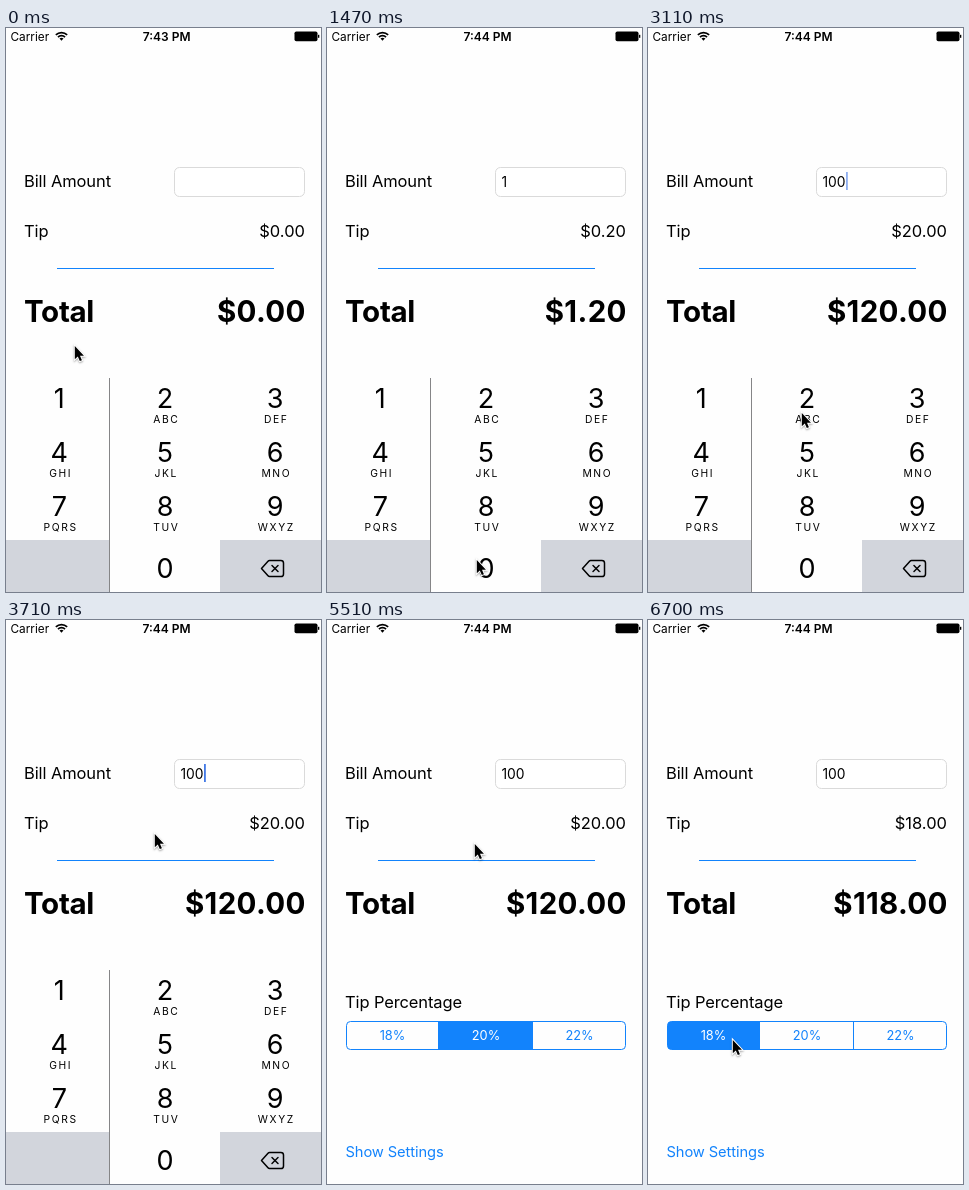
Animation, 315 px wide and 564 px high, one loop 8 s. Source, as an HTML page with a canvas:

```html
<!DOCTYPE html>
<html lang="en">
<head>
<meta charset="utf-8">
<title>Tip calculator</title>
<style>
  html, body { margin: 0; width: 100%; height: 100%; overflow: hidden; background: #fefefe; }
  canvas { display: block; width: 315px; height: 564px; }
</style>
</head>
<body>
<canvas id="stage"></canvas>
<script>
const W = 315, H = 564, LOOP = 8000;
const BG = '#fefefe', BLUE = '#1283fc', GREY = '#d2d5dc';
const canvas = document.getElementById('stage');
const ctx = canvas.getContext('2d');
const dpr = window.devicePixelRatio || 1;
canvas.width = W * dpr;
canvas.height = H * dpr;

// Each track is a list of [time, value...]; a value holds until the next one.
const tracks = {
  pointer: [[0, 68, 317], [140, 63, 341], [290, 59, 363], [1190, 76, 402], [1320, 123, 487],
    [1470, 149, 531], [1620, 150, 537], [3110, 153, 384], [3260, 153, 310], [3410, 151, 254],
    [3560, 149, 226], [3710, 148, 213], [5510, 147, 223], [5660, 129, 293], [5800, 105, 363],
    [5950, 89, 407], [6100, 84, 419]],
  bill: [[0, ''], [890, '1'], [1920, '10'], [2670, '100']],
  caret: [[0, 0], [140, 1], [1320, 0], [1620, 1], [3110, 0.6], [3260, 0], [3560, 1], [4010, 0]],
  clock: [[0, '7:43 PM'], [1190, '7:44 PM']],
  pressed: [[0, ''], [740, '1'], [890, ''], [2520, '0'], [2670, '']],
  slide: [[0, 0], [4010, 111], [4160, 179], [4310, 208], [4460, 220]],
  segment: [[0, 1], [6700, 0]],
  touch: [[0, false], [6550, true], [6700, false]]
};
const rates = [18, 20, 22];
const keys = [['1', ''], ['2', 'ABC'], ['3', 'DEF'], ['4', 'GHI'], ['5', 'JKL'], ['6', 'MNO'],
  ['7', 'PQRS'], ['8', 'TUV'], ['9', 'WXYZ'], ['', ''], ['0', ''], ['del', '']];
const colX = [0, 104, 214, 315], keyX = [53.3, 159, 269];
const KEY_TOP = 350, ROW = 54, LEFT = 18, RIGHT = 299;

function at(track, t) {
  let current = track[0];
  for (const step of track) if (step[0] <= t) current = step;
  return current;
}
const value = (name, t) => at(tracks[name], t)[1];
const money = n => '$' + n.toFixed(2);

function text(str, x, y, size, { weight = 400, color = '#000', align = 'left', track = 0 } = {}) {
  ctx.font = `${weight} ${size}px Inter, Roboto, sans-serif`;
  ctx.letterSpacing = track + 'px';
  ctx.textAlign = align;
  ctx.fillStyle = color;
  ctx.fillText(str, x, y);
}

function rect(x, y, w, h, color) {
  ctx.fillStyle = color;
  ctx.fillRect(x, y, w, h);
}

function poly(points, close) {
  ctx.beginPath();
  points.forEach(([x, y]) => ctx.lineTo(x, y));
  if (close) ctx.closePath();
}

function round(x, y, w, h, r) {
  ctx.beginPath();
  ctx.roundRect(x, y, w, h, r);
}

function stroke(color, width) {
  ctx.strokeStyle = color;
  ctx.lineWidth = width;
  ctx.stroke();
}

function statusBar(clock) {
  text('Carrier', 4.5, 12.5, 11.8);
  text(clock, 160.6, 12.5, 12, { weight: 600, align: 'center' });
  const a = -Math.PI * 0.75, b = -Math.PI * 0.25;
  for (const r of [5, 8]) {
    ctx.beginPath();
    ctx.arc(55.5, 12.6, r, a, b);
    stroke('#000', 1.7);
  }
  ctx.beginPath();
  ctx.moveTo(55.5, 12.8);
  ctx.arc(55.5, 12.6, 2.8, a, b);
  ctx.fillStyle = '#000';
  ctx.fill();
  round(288.5, 3.4, 23, 9.8, 1.8);
  ctx.fill();
  rect(312, 6.8, 1.3, 3, '#000');
}

function billForm(bill, caret, rate) {
  const amount = Number(bill), tip = amount * rate / 100;
  text('Bill Amount', LEFT, 159, 16.5, { track: -0.1 });
  round(168.5, 139.5, 130, 29, 5);
  ctx.fillStyle = '#fff';
  ctx.fill();
  stroke('#dadada', 1);
  text(bill, 174.5, 159, 13.8);
  if (caret) {
    const x = 175 + ctx.measureText(bill).width;
    ctx.globalAlpha = caret;
    rect(x, 144, 1.8, 18, '#4279e6');
    ctx.globalAlpha = 1;
  }
  text('Tip', LEFT, 209, 16.5, { track: -0.1 });
  text(money(tip), RIGHT, 209, 16.5, { align: 'right' });
  rect(51, 240, 217, 1, BLUE);
  text('Total', LEFT, 294, 29.5, { weight: 700, track: -0.3 });
  text(money(amount + tip), RIGHT + 0.8, 294, 29.5, { weight: 700, align: 'right', track: 0.35 });
}

function tipPicker(selected, touched) {
  const edges = [19, 112, 206, 299];
  text('Tip Percentage', LEFT, 388, 16.5, { track: -0.12 });
  ctx.save();
  round(19.5, 401.5, 279, 28, 4);
  ctx.clip();
  if (touched) rect(19, 401, 93, 29, '#d6e9ff');
  rect(edges[selected], 401, edges[selected + 1] - edges[selected], 29, BLUE);
  ctx.restore();
  round(19.5, 401.5, 279, 28, 4);
  stroke(BLUE, 1);
  rect(111, 401, 1, 29, BLUE);
  rect(205, 401, 1, 29, BLUE);
  rates.forEach((rate, i) => text(rate + '%', [65.5, 159, 252.5][i], 420.3, 12.8,
    { color: i === selected ? '#fff' : BLUE, align: 'center' }));
  text('Show Settings', LEFT + 0.5, 536.5, 14.7, { color: BLUE, track: -0.1 });
}

function deleteIcon() {
  ctx.lineJoin = ctx.lineCap = 'round';
  ctx.beginPath();
  ctx.moveTo(255.5, 540.5);
  ctx.lineTo(262, 533.2);
  ctx.arcTo(262.6, 532.5, 265, 532.5, 2);
  ctx.arcTo(277.5, 532.5, 277.5, 540, 2.6);
  ctx.arcTo(277.5, 548.5, 270, 548.5, 2.6);
  ctx.arcTo(262.6, 548.5, 262, 547.8, 2);
  ctx.closePath();
  stroke('#000', 1.5);
  for (const s of [-1, 1]) {
    poly([[266, 540.5 - 3 * s], [272, 540.5 + 3 * s]]);
    stroke('#000', 1.5);
  }
  ctx.lineCap = 'butt';
}

function keypad(slide, pressed) {
  if (slide >= H - KEY_TOP) return;
  ctx.save();
  ctx.translate(0, slide);
  rect(0, KEY_TOP, W, H - KEY_TOP, BG);
  keys.forEach(([digit, letters], i) => {
    const col = i % 3, row = Math.floor(i / 3), y = KEY_TOP + row * ROW;
    const blank = !digit || digit === 'del';
    if (blank || digit === pressed) rect(colX[col], y, colX[col + 1] - colX[col], ROW, GREY);
    if (blank) return;
    text(digit, keyX[col], y + (row === 3 ? 37.5 : 30), 27, { align: 'center' });
    text(letters, keyX[col] + 1.3, y + 45.3, 10.3, { align: 'center', track: 1.6 });
  });
  deleteIcon();
  if (slide) {
    rect(103, KEY_TOP, 1, 214, '#d0d0d2');
    rect(214, KEY_TOP, 1, 214, '#d0d0d2');
    rect(0, KEY_TOP + ROW, W, 1, '#858587');
  } else {
    rect(103, KEY_TOP, 1, 214, '#858587');
  }
  ctx.restore();
}

function pointer(x, y) {
  ctx.save();
  ctx.translate(x + 0.8, y + 1);
  ctx.scale(0.88, 0.88);
  ctx.lineJoin = 'miter';
  poly([[0, 0], [0, 15], [3.4, 11.8], [5.7, 17.1], [8.1, 16.1], [5.9, 11], [10.4, 11]], true);
  ctx.shadowColor = 'rgba(0,0,0,.35)';
  ctx.shadowBlur = 2 * dpr;
  ctx.shadowOffsetY = dpr;
  stroke('#fff', 2.2);
  ctx.shadowColor = 'transparent';
  ctx.fillStyle = '#000';
  ctx.fill();
  ctx.restore();
}

function draw(t) {
  const selected = value('segment', t);
  const [, x, y] = at(tracks.pointer, t);
  ctx.setTransform(dpr, 0, 0, dpr, 0, 0);
  rect(0, 0, W, H, BG);
  statusBar(value('clock', t));
  billForm(value('bill', t), value('caret', t), rates[selected]);
  tipPicker(selected, value('touch', t));
  keypad(value('slide', t), value('pressed', t));
  pointer(x, y);
}

function tick() {
  draw(performance.now() % LOOP);
  requestAnimationFrame(tick);
}
tick();
</script>
</body>
</html>
```
